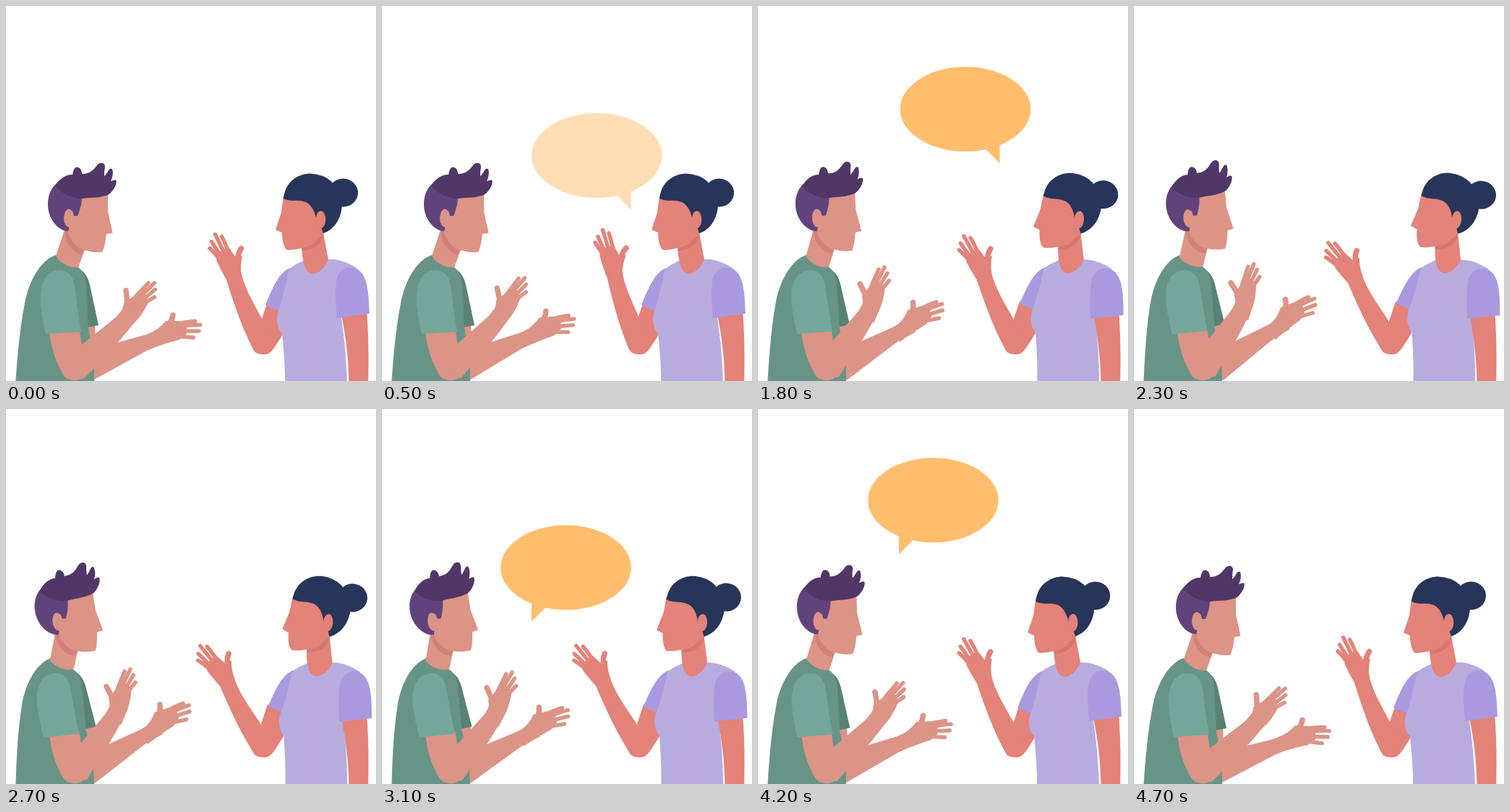
These frames come from a looping animation (512x518 px, 4800 ms). An HTML page:

```html
<!DOCTYPE html>
<html lang="en">
<head>
<meta charset="utf-8">
<title>Conversation</title>
<style>
  html, body { margin: 0; width: 100%; height: 100%; overflow: hidden; background: #fff; }
  svg { display: block; width: 100%; height: 100%; }
  .man { fill: #dc9486; stroke: #dc9486; }
  .woman { fill: #e38379; stroke: #e38379; }
  .skin { stroke-width: 0; }
  .finger { fill: none; stroke-width: 5.4; stroke-linecap: round; }
  .thumb { fill: none; stroke-width: 7.5; stroke-linecap: round; }
  .cloth { stroke: none; }
</style>
</head>
<body>
<svg viewBox="0 0 512 518">
  <g class="man">
    <!-- far arm -->
    <path class="skin" d="M110 436H123L124 466 130 500H112Z"/>
    <g id="lowArm">
      <path class="skin" d="M118 478L150 466 190 455Q205 451 214 444L224 465Q208 470 195 476L122 516C105 520 100 490 118 478Z"/>
      <g id="lowHand">
        <path class="skin" d="M196 453Q212 447 221 435L240 435 250 440 250 453 240 461Q220 466 198 474Z"/>
        <path class="thumb" d="M221 445Q230 436 231 427"/>
        <path class="finger" d="M232 440Q248 436 262 435.500M238 444Q254 440 269 440.500M238 449H267M234 456Q248 457 259.500 458"/>
      </g>
    </g>
    <g class="cloth manTorso">
      <path fill="#588274" d="M98 362C108 366 113 373 116 385L128 441 112 444 104 380Z"/>
      <path fill="#689488" d="M12 535C17 470 20 440 27 405C34 375 50 350 69 344L100 361C107 366 110 373 111 385L114 445 122 490V535Z"/>
    </g>
    <!-- near arm -->
    <path class="skin" d="M60 448L101 445 105 468 120 472 124 490 107 513C100 519 86 518 80 511C70 494 62 474 60 448Z"/>
    <g id="highArm">
      <path class="skin" d="M96 475L152 430 162 418 183 429C170 449 145 476 124 498L108 515 90 512Z"/>
      <g id="highHand">
        <path class="skin" d="M152 431Q162 423 163 410L172 404 184 397 194 399 197 409Q190 424 182 433L166 450Z"/>
        <path class="thumb" d="M168 418Q168 405 166 393"/>
        <path class="finger" d="M176 405L197 382.500M181 406L205.500 382.500M184 410L206.500 391.500M187 413L205.500 402"/>
      </g>
    </g>
    <g class="manTorso">
      <path class="cloth" fill="#74a79a" d="M55 453C50 430 47 412 48 398C49 375 62 364 76 365C88 366 93 375 95 387C97 405 100 427 104 450Z"/>
      <g id="manHead" class="skin">
        <path d="M82 300L80 312 69 345C78 358 90 362 100 361L109 337Z"/>
        <path fill="#d4817a" d="M82 311C81 325 90 340 105 343L108 337C97 334 88 322 86 311Z"/>
        <path d="M95 262L141 260V284L147.500 313.500 139 315Q137 333 133 340Q112 341 104 334L86 311 85 285Z"/>
        <path fill="#61437c" d="M70 245C57 256 56 275 60 287C64 300 75 311 86 311L88 304 92 282 94 290H99C103 280 105 272 105 264Z"/>
        <ellipse cx="87" cy="293" rx="7" ry="12.500"/>
        <path fill="#503768" d="M68 248C75 237 85 232 92 233C94 222 98 221 102 224C105 227 105 230 105 232C115 232 120 228 126 220C130 215 137 216 137 222C136 228 136 231 136 235C141 231 142 223 147 225C149 232 147 238 145 242C148 241 151 239 152.500 241C154 246 148 257 141 261C128 266 118 264 105 266C92 266 78 260 68 248Z"/>
      </g>
    </g>
  </g>

  <g class="woman">
    <!-- raised arm -->
    <path class="skin" d="M362 408L354 432 340 468C342 480 350 482 360 481C367 480 371 473 384 452L380 415Z"/>
    <g id="wArm">
      <path class="skin" d="M304 375C315 410 325 440 340 470C344 480 360 480 366 470L354 432C342 409 329 388 325 366Z"/>
      <g id="wHand">
        <path class="skin" d="M305 378Q299 368 291 351L297 339 308 333 317 346 327 345Q324 357 325.500 370Z"/>
        <path class="thumb" d="M320 353Q321 341 325.500 335"/>
        <path class="finger" d="M298 354Q290 342 282 334.500M299 348L284.500 325.500M304 345L289.500 315.500M309 344Q304 328 298.500 318.500"/>
      </g>
    </g>
    <g class="cloth wTorso">
      <path fill="#ab99e0" d="M397 361C380 364 370 385 359 413L378 421 392 400Z"/>
      <path fill="#b8acdf" d="M386 535C387 500 384 475 382 452C374 445 373 428 378 418C384 400 388 380 391 364C398 358 405 355 411 352L446 350C458 349 472 354 484 361L490 370 464 430C468 460 472 490 472 535Z"/>
    </g>
    <path class="skin" d="M464 426L499 420C502 455 502 490 501 530H474.500C474.500 500 473 470 464 426Z"/>
    <g class="wTorso">
      <path class="cloth" fill="#ab99e0" d="M458 431C456 410 455 390 458 375C465 360 478 358 487 364C500 372 502 395 503 425Z"/>
      <g id="wHead" class="skin">
        <path d="M438 308L446 350C440 365 430 370 424 370C414 369 410 355 409 332Z"/>
        <path fill="#d6766f" d="M409 334C420 333 430 328 434 314H439C439 328 428 337 410 338Z"/>
        <path d="M384 262L381 285 373 309 382 313C382 325 385 335 389 337C400 337 412 335 420 328Q432 322 440 314L438 290 420 262Z"/>
        <g fill="#27355a">
          <path d="M384 266C386 243 404 231.500 421 231.500Q439 232 451 243L465 275C464 294 454 309 439 314L434 300 429 293C427 282 421 272 412 270C402 267 394 271 384 266Z"/>
          <ellipse cx="466.500" cy="258" rx="20.500" ry="19.500"/>
        </g>
        <ellipse cx="435.500" cy="295" rx="6.800" ry="12"/>
      </g>
    </g>
  </g>

  <g id="bubble" fill="#ffbe6e">
    <ellipse rx="90.300" ry="58.500"/>
    <path d="M27 54L47.500 75V46Z"/>
  </g>
</svg>
<script>
const LOOP = 4800, STEP = 100;
const linear = x => x;
const sine = x => (1 - Math.cos(Math.PI * x)) / 2;

// Value at time t along [time, value] keys.
function track(t, keys, ease = sine) {
  if (t <= keys[0][0]) return keys[0][1];
  for (let i = 1; i < keys.length; i++) {
    const [t0, v0] = keys[i - 1], [t1, v1] = keys[i];
    if (t <= t1) return v0 + (v1 - v0) * ease((t - t0) / (t1 - t0));
  }
  return keys[keys.length - 1][1];
}

function turn(selector, angle, x, y) {
  for (const el of document.querySelectorAll(selector))
    el.setAttribute('transform', `rotate(${angle} ${x} ${y})`);
}

const bubbles = [
  { path: [[600, 206.5], [1000, 186], [1200, 174], [1800, 142.5], [2000, 134.5]],
    fade: [[400, 0], [600, 1], [1900, 1], [2100, 0]], x: 287, y: 142.5, drift: 0.159, side: 1 },
  { path: [[3000, 227], [3100, 219], [3600, 172], [4200, 126], [4400, 119.5]],
    fade: [[2800, 0], [3000, 1], [4300, 1], [4500, 0]], x: 242.5, y: 126, drift: 0.129, side: -1 }
];

function drawBubble(t) {
  const b = bubbles[t < 2400 ? 0 : 1];
  const y = track(t, b.path, linear);
  const x = b.x + (y - b.y) * b.drift;
  const el = document.getElementById('bubble');
  el.setAttribute('transform', `translate(${x} ${y}) scale(${b.side} 1)`);
  el.setAttribute('opacity', track(t, b.fade, linear));
}

function draw(t) {
  const manLean = track(t, [[1050, 0], [3050, 1], [4700, 0]]);
  turn('.manTorso', -2.6 * manLean, 70, 520);
  turn('#manHead', -6 * manLean, 95, 356);

  const lift = track(t, [[0, 0], [2350, 1.05], [4700, -0.11]], linear);
  turn('#highArm', -13 * lift, 97, 495);
  turn('#highHand', -11 * lift, 168, 428);
  turn('#lowArm', -10.5 * lift, 122, 500);
  turn('#lowHand', -10 * lift, 208, 455);

  const womanLean = track(t, [[450, 0], [2350, 1], [4400, 0]]);
  turn('.wTorso', 2 * womanLean, 436, 525);
  turn('#wHead', 3 * womanLean, 436, 350);

  const wave = track(t, [[0, 0], [1000, 8.3], [2300, -5.8], [3100, -5.8], [4700, 0]]);
  turn('#wArm', wave, 355, 465);
  turn('#wHand', 1.25 * wave, 315, 368);

  drawBubble(t);
}

const start = performance.now();
function tick() {
  const t = (performance.now() - start) % LOOP;
  draw(Math.floor(t / STEP) * STEP);
  requestAnimationFrame(tick);
}
tick();
</script>
</body>
</html>
```
